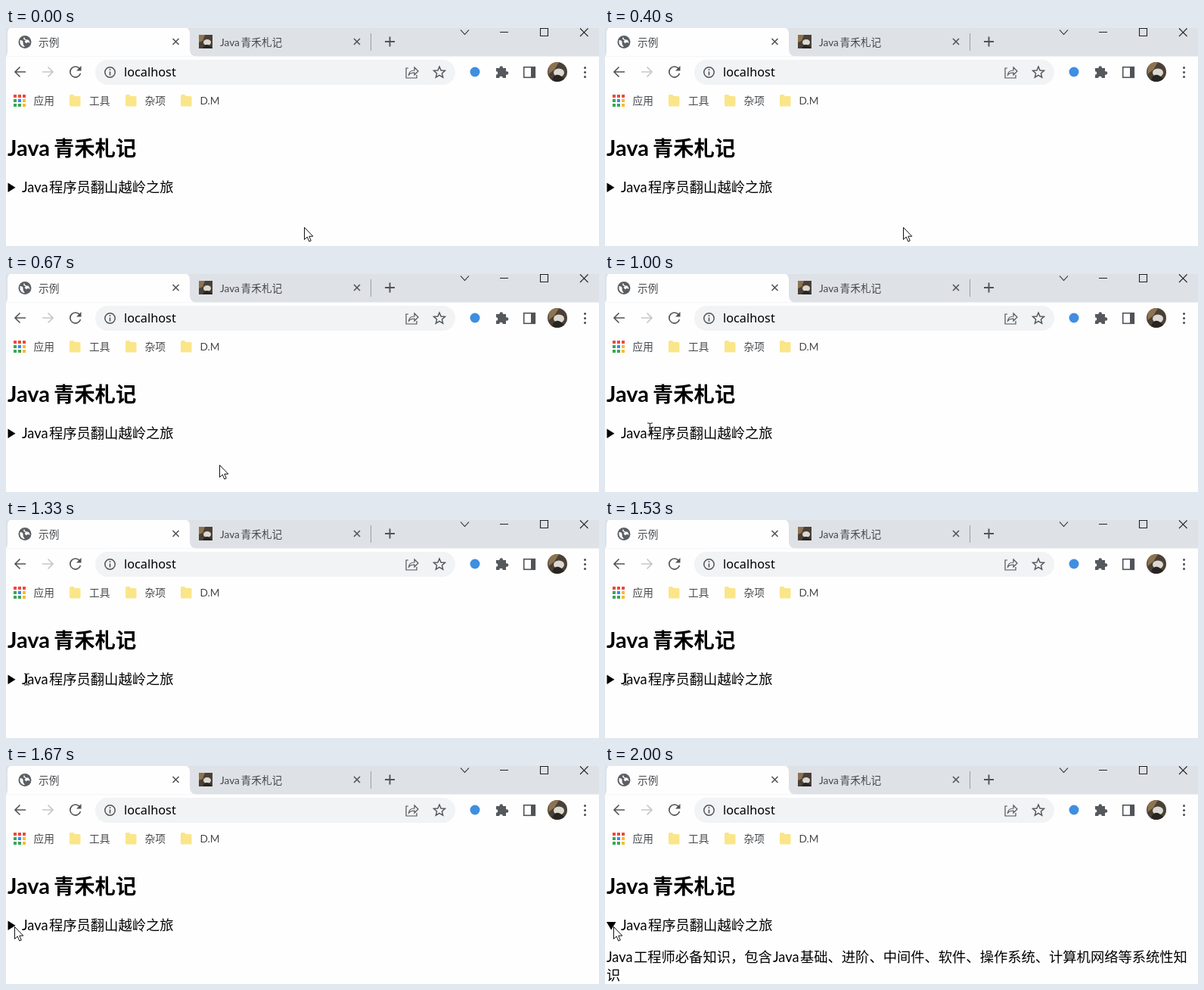
These frames come from a looping animation (784 by 288 pixels, 2330 ms). An HTML page:

```html
<!DOCTYPE html>
<html lang="zh-CN">
<head>
<meta charset="utf-8">
<title>示例</title>
<style>
  html, body { margin: 0; width: 100%; height: 100%; overflow: hidden; background: #fefefe; }
  svg { display: block; }
  text { font-family: Lato, "Noto Sans CJK SC", "Noto Sans CJK", sans-serif; fill: #000; }
  .small { font-size: 13.7px; fill: #45484c; }
  .body { font-size: 18.3px; }
  .line { fill: none; stroke: #505357; stroke-width: 1.6; }
  .thin { fill: none; stroke: #222; stroke-width: 1.1; }
</style>
</head>
<body>
<svg width="784" height="288" viewBox="0 0 784 288">
  <defs>
    <path id="close" d="M-4-4 4 4M4-4-4 4"/>
    <path id="folder" d="M0 1.500Q0 0 1.500 0H5L7 2H13Q14.500 2 14.500 3.500V14Q14.500 15.500 13 15.500H1.500Q0 15.500 0 14Z" fill="#fae588"/>
  </defs>

  <!-- tab strip -->
  <rect width="784" height="37.500" fill="#dee1e6"/>
  <path d="M0 37.500Q2 36 2 30V7Q2-1 10-1H234Q243-1 243 8V28Q243 37.500 252 37.500Z" fill="#fefefe"/>
  <circle cx="25" cy="18.500" r="8.500" fill="#5b5e62"/>
  <path d="M18.500 16Q23 16 22.500 19T25 25Q20 25 18.500 20ZM24 11.500Q25 16 28 15.500T31.500 20Q28 18 27 20.500L24.500 18 26 16.500 23 14.500Z" fill="#fefefe"/>
  <text x="43" y="23.500" class="small">示例</text>
  <g class="line">
    <use href="#close" x="224.500" y="18"/>
    <use href="#close" x="464" y="18"/>
    <path d="M501 18H514M507.500 11.500V24.500" stroke-width="1.900"/>
  </g>
  <path d="M482.500 7V30" stroke="#999ca1"/>
  <rect x="255" y="9" width="18" height="18" fill="#4a4036"/>
  <path d="M255 9H263L260 17 255 19Z" fill="#8d7350"/>
  <ellipse cx="266" cy="19" rx="5" ry="4" fill="#dcd9d2"/>
  <path d="M260 27Q263 20 269 23L273 27Z" fill="#282420"/>
  <text y="23.500" class="small"><tspan x="283">Java</tspan><tspan x="310.500">青禾札记</tspan></text>
  <path class="thin" d="M601 2.500 606.500 8.500 612 2.500M653 5.500H664M706.500.5H716.500V10.500H706.500ZM759 .5 769.500 11M769.500.5 759 11"/>

  <!-- toolbar -->
  <rect x="118" y="42" width="476" height="33" rx="16.500" fill="#f1f3f4"/>
  <g class="line">
    <path d="M26 58H12M18.500 51.500 12 58 18.500 64.500"/>
    <path d="M48 58H62M55.500 51.500 62 58 55.500 64.500" stroke="#c4c6c9"/>
    <path d="M97.500 54A7 7 0 1 0 98.500 60"/>
    <circle cx="137.500" cy="58.500" r="6.700" stroke-width="1.500"/>
    <path d="M137.500 57.500V62.500M137.500 54.300V56"/>
    <path d="M532 53H529V66H543V62M532.500 62Q533 56 540 56V52L545 57 540 62V59Q535 59 532.500 62Z" stroke-width="1.200"/>
    <path d="M573 51 575.100 56 580.500 56.400 576.400 59.900 577.700 65.300 573 62.400 568.300 65.300 569.600 59.900 565.500 56.400 570.900 56Z" stroke-width="1.400"/>
    <rect x="684.700" y="51.700" width="14.600" height="13.600"/>
  </g>
  <path d="M99.500 50V56.500H93Z" fill="#505357"/>
  <text x="156" y="64" font-size="16.300" style="font-family: 'Noto Sans', sans-serif">localhost</text>
  <circle cx="620" cy="58" r="6.500" fill="#3f8ee0"/>
  <path d="M648 53H652.500V52A2.300 2.300 0 0 1 657 52V53H661V57.200H662A2.300 2.300 0 0 1 662 61.800H661V66H656.800A2.300 2.300 0 0 0 652.200 66H648V61.800A2.300 2.300 0 0 0 648 57.200Z" fill="#55585c"/>
  <path d="M694 51H700V66H694Z" fill="#505357"/>
  <circle cx="729" cy="58" r="13" fill="#4a4036"/>
  <path d="M718 51A13 13 0 0 1 731 45.200L725 55 717 61Z" fill="#8d7350"/>
  <ellipse cx="731" cy="59" rx="7" ry="5.500" fill="#dcd9d2"/>
  <path d="M722 69Q725 59 733 63L738 67A13 13 0 0 1 722 69Z" fill="#282420"/>
  <path d="M765.500 52.500V52.500M765.500 58.500V58.500M765.500 64.500V64.500" stroke="#505357" stroke-width="3.200" stroke-linecap="round"/>

  <!-- bookmarks -->
  <g id="apps"></g>
  <text y="101" class="small"><tspan x="36.500">应用</tspan><tspan x="110">工具</tspan><tspan x="183.500">杂项</tspan><tspan x="256.500">D.M</tspan></text>
  <use href="#folder" x="84" y="88"/>
  <use href="#folder" x="158" y="88"/>
  <use href="#folder" x="231" y="88"/>

  <!-- page -->
  <text y="168.500" font-size="27.300" font-weight="700"><tspan x="2" font-size="29">Java</tspan><tspan x="63">青禾札记</tspan></text>
  <path id="marker"/>
  <text y="217" class="body"><tspan x="21">Java</tspan><tspan x="57">程序员翻山越岭之旅</tspan></text>
  <g id="details">
    <text y="259" class="body"><tspan x="2">Java</tspan><tspan x="38">工程师必备知识，包含</tspan><tspan x="222">Java</tspan><tspan x="258">基础、进阶、中间件、软件、操作系统、计算机网络等系统性知</tspan></text>
    <text x="2" y="283" class="body">识</text>
  </g>

  <!-- pointers, each with its hot spot at the origin -->
  <path id="arrow" d="M.5.5V16.500L4.200 13 6.800 19 9.300 18 6.800 12.200H11.800Z" fill="#fff" stroke="#111" stroke-width="1"/>
  <path id="beam" d="M-3.500-7.500H-1.500L0-6.500 1.500-7.500H3.500M0-6.500V6.500M-3.500 7.500H-1.500L0 6.500 1.500 7.500H3.500" class="thin"/>
</svg>
<script>
  const el = id => document.getElementById(id);
  const LOOP = 2330, OPEN_AT = 2000;
  const stops = [
    { at: 0, x: 394, y: 263, shape: 'arrow' },
    { at: 670, x: 282, y: 252, shape: 'arrow' },
    { at: 1000, x: 59.5, y: 204.5, shape: 'beam' },
    { at: 1330, x: 27.5, y: 210.5, shape: 'beam' },
    { at: 1670, x: 11, y: 212, shape: 'arrow' }
  ];

  const red = '#ea4a3c', green = '#3aa657', blue = '#4285f4', yellow = '#f8bb2d';
  el('apps').innerHTML = [red, red, red, green, blue, yellow, green, green, yellow]
    .map((color, i) => `<rect x="${10 + i % 3 * 6}" y="${88 + Math.floor(i / 3) * 6}" width="4" height="4" fill="${color}"/>`)
    .join('');

  function draw(now) {
    const t = now % LOOP;
    const stop = stops.findLast(s => t >= s.at);
    const open = t >= OPEN_AT;
    for (const id of ['arrow', 'beam']) {
      el(id).setAttribute('visibility', id === stop.shape ? 'visible' : 'hidden');
      el(id).setAttribute('transform', `translate(${stop.x} ${stop.y})`);
    }
    el('marker').setAttribute('d', open ? 'M2 206H14.500L8.200 216.500Z' : 'M2.500 204.500V217L12.500 210.800Z');
    el('details').setAttribute('visibility', open ? 'visible' : 'hidden');
  }

  function tick() {
    draw(performance.now());
    requestAnimationFrame(tick);
  }
  tick();
</script>
</body>
</html>
```
